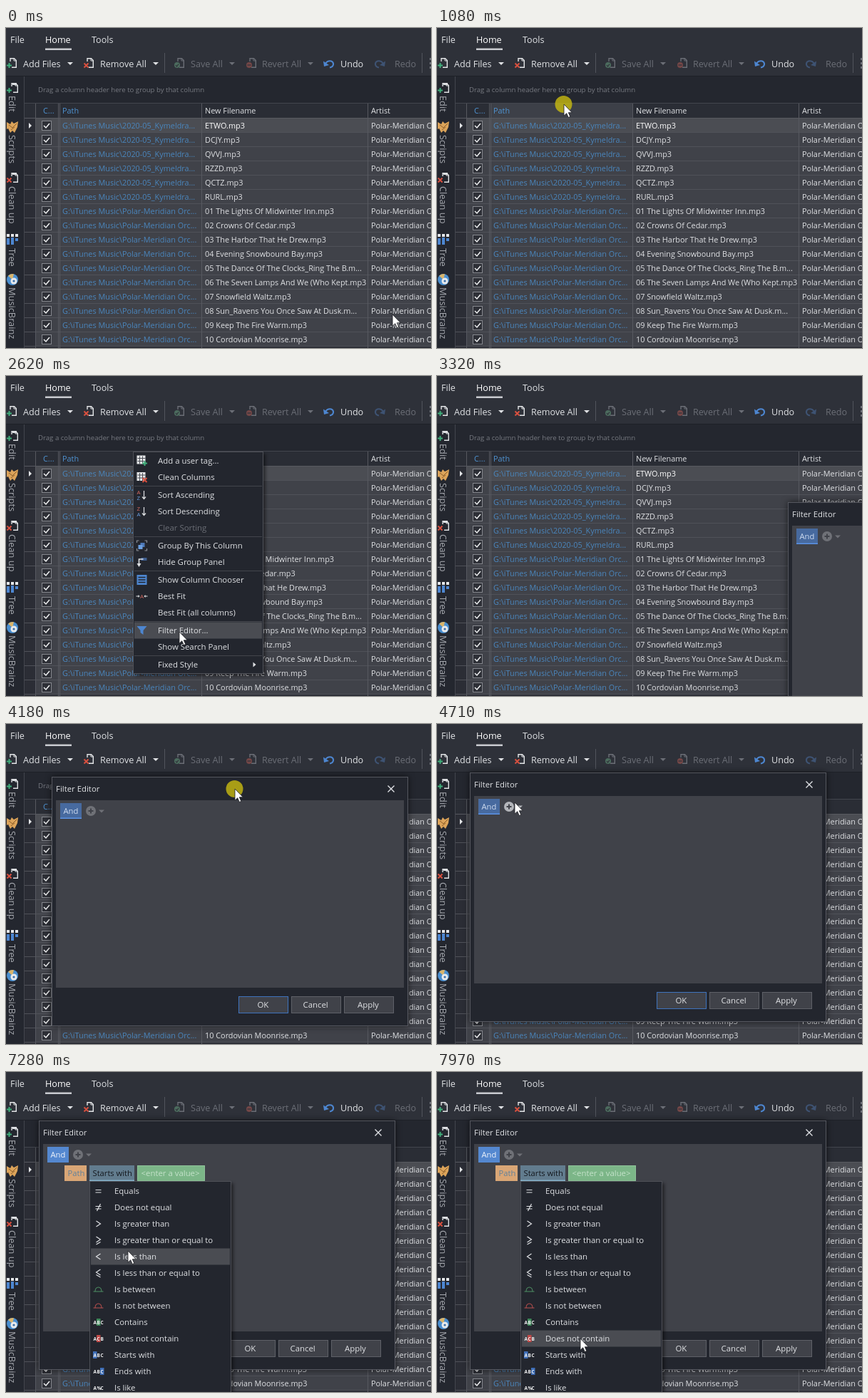
Recreate the animation shown at these times as an HTML page. Size 596x449 px, loop 8 s.

```html
<!DOCTYPE html>
<html lang="en">
<head>
<meta charset="utf-8">
<title>Filter editor demo</title>
<style>
html, body { margin: 0; width: 100%; height: 100%; overflow: hidden; background: #2e3139; }
svg { display: block; font-family: "Open Sans", "Noto Sans", sans-serif; }
.dialog { filter: drop-shadow(0 0 5px rgba(0, 0, 0, .6)); }
.menu { filter: drop-shadow(3px 3px 2px rgba(0, 0, 0, .45)); }
</style>
</head>
<body>
<svg id="stage" width="596" height="449" viewBox="0 0 596 449"></svg>
<script>
const LOOP = 8000;
const UI = 11.4, GRID = 10.87, BAR = 12.6;
const INK = '#dfe1e4', DIM = '#6b6e76', BLUE = '#4a86bd', DARK = '#23262e', BODY = '#404249', LINE = '#575960';

const rect = (x, y, w, h, fill, more = '') =>
  `<rect x="${x}" y="${y}" width="${w}" height="${h}" fill="${fill}" ${more}/>`;
const box = (x, y, w, h, fill, stroke, more = '') =>
  rect(x + .5, y + .5, w - 1, h - 1, fill, `stroke="${stroke}" ${more}`);
const text = (x, y, s, size = UI, fill = INK, more = '') =>
  `<text x="${x}" y="${y}" font-size="${size}" fill="${fill}" ${more}>${s}</text>`;
const stroke = (d, color, width = 1.2) =>
  `<path d="${d}" fill="none" stroke="${color}" stroke-width="${width}"/>`;
const fill = (d, color) => `<path d="${d}" fill="${color}"/>`;
const dot = (x, y, r, color) => `<circle cx="${x}" cy="${y}" r="${r}" fill="${color}"/>`;
const group = (id, inner, more = '') => `<g id="${id}" ${more}>${inner}</g>`;
const at = (x, y, inner) => `<g transform="translate(${x} ${y})">${inner}</g>`;
const caret = (x, y, color = INK) => fill(`M${x - 4} ${y - 2}h8l-4 4z`, color);
const cross = (x, y, r, color, w) =>
  stroke(`M${x - r} ${y - r}l${2 * r} ${2 * r}m0 ${-2 * r}l${-2 * r} ${2 * r}`, color, w);
const plus = (x, y, r, color, w) => stroke(`M${x - r} ${y}h${2 * r}M${x} ${y - r}v${2 * r}`, color, w);

// Ribbon
function page(x, y, color, mark) {
  return at(x, y, stroke('M5 5V.7H10.5L13.3 3.5V13.3H7', color, 1.4) + stroke('M10 1v3h3', color, 1) + mark);
}

function undoIcon(x, color) {
  return at(x, 43, stroke('M3 7C6 2 13 2 14 7C14.5 10 12 12 9 12.5', color, 2.2) + fill('M0 3.5L1 11L8 9z', color));
}

function ribbon() {
  const button = (x, label, color) => text(x, 55, label, BAR, color);
  return rect(0, 0, 596, 67, '#2e3139') + rect(0, 67, 596, 1, '#1d2027') +
    text(6, 21, 'File', BAR) + text(55, 21, 'Home', BAR, '#fff') + text(120, 21, 'Tools', BAR) +
    rect(55, 28.5, 37, 2.5, '#c9cbd0') +
    page(1, 42, '#e4e6e8', plus(3.5, 10.5, 3.5, '#3fae7a', 2)) + button(24, 'Add Files', INK) + caret(90, 50) +
    page(109, 42, '#e4e6e8', cross(3.5, 10.5, 3, '#d8503f', 2)) + button(132, 'Remove All', INK) + caret(210, 50) +
    rect(222, 35, 1, 28, '#51545c') +
    page(236, 42, DIM, dot(4, 10, 4, '#4c6c5e') + stroke('M2 10l1.5 2L6 8.5', '#2e3139')) +
    button(259, 'Save All', DIM) + caret(317, 50, DIM) +
    page(337, 42, DIM, dot(4, 10, 4, '#744747') + stroke('M1.5 10h5', '#2e3139')) +
    button(359, 'Revert All', DIM) + caret(427, 50, DIM) +
    undoIcon(445, '#4d86d0') + button(469, 'Undo', INK) +
    `<g transform="translate(978 0) scale(-1 1)">${undoIcon(446, '#3e5373')}</g>` + button(545, 'Redo', DIM) +
    rect(583, 35, 1, 28, '#51545c') + rect(594, 42, 2, 3, DIM) + rect(594, 48, 2, 3, DIM) + rect(594, 54, 2, 3, DIM);
}

// Side tabs
function sidebar() {
  const tabs = [
    [95, 'Edit', page(3, 77, '#dfe1e4', rect(6, 0, 6, 3, '#dfe1e4') + plus(1.5, 10.5, 3.5, '#3fae7a', 2))],
    [150, 'Scripts', fill('M1 132l5 3 2-4 3 3 6-3-1 8-4 8-3-3-3 3-3-6-2 1z', '#dca45a') +
      stroke('M4 136l5 4 6-6M7 143l5-4', '#8c5c28', 1)],
    [222, 'Clean up', page(3, 203, '#dfe1e4', rect(6, 0, 6, 3, '#dfe1e4') + cross(1.5, 10.5, 3, '#d8503f', 2))],
    [309, 'Tree', [[1, 289, 4], [7, 289, 4], [13, 289, 4]].map(([x, y, w]) => rect(x, y, w, 4, '#e4e6e8')).join('') +
      rect(1, 295, 4, 9, '#4d86d0') + rect(7, 294, 4, 10, '#4d86d0') + rect(13, 295, 4, 4, '#4d86d0')],
    [364, 'MusicBrainz', dot(9, 353, 8, '#4a8fd0') + fill('M9 353L3 347.700A8 8 0 0 1 11 345.300z', '#d9b56c') +
      dot(11, 355, 4.5, '#e8eaec') + dot(11, 355, 1.6, '#3a6ea8')]
  ];
  return rect(0, 68, 26, 381, '#24272f') + rect(25, 68, 1, 381, '#43464e') +
    tabs.map(([y, label, icon]) => icon +
      `<g transform="translate(4 ${y}) rotate(90)">${text(0, 0, label, 12.8, '#a6a9af')}</g>`).join('');
}

// Music grid
const FILES = ['ETWO', 'DCJY', 'QVVJ', 'RZZD', 'QCTZ', 'RURL',
  '01 The Lights Of Midwinter Inn', '02 Crowns Of Cedar', '03 The Harbor That He Drew',
  '04 Evening Snowbound Bay', '05 The Dance Of The Clocks_Ring The B.m...',
  '06 The Seven Lamps And We (Who Kept', '07 Snowfield Waltz',
  '08 Sun_Ravens You Once Saw At Dusk.m...', '09 Keep The Fire Warm', '10 Cordovian Moonrise'];

function row(name, i) {
  const y = 127 + 20 * i, base = y + 14;
  const folder = i < 6 ? '2020-05_Kymeldra...' : 'Polar-Meridian Orc...';
  return rect(42, y, 554, 19, i ? BODY : '#4b4d53') + rect(26, y + 19, 570, 1, '#505259') +
    box(50, y + 3, 14, 14, '#2d2f36', '#85878d') + stroke(`M53 ${y + 10}l3 3l5 -6`, '#f0f1f2', 1.5) +
    text(79, base, 'G:\\iTunes Music\\' + folder, GRID, BLUE) +
    text(279, base, name.endsWith('...') ? name : name + '.mp3', GRID, i ? INK : '#fff') +
    text(512, base, 'Polar-Meridian Orchestra', GRID);
}

function grid() {
  const columns = [41, 73, 75, 274, 507].map(x => rect(x, 106, 1, 343, LINE)).join('');
  return rect(26, 68, 570, 38, '#24272f') + text(45, 90, 'Drag a column header here to group by that column', 9.63, '#777a81') +
    rect(26, 105, 570, 344, '#2b2d35') + rect(26, 105, 570, 1, '#43464e') + rect(26, 106, 570, 20, '#2a2d35') +
    group('pathHead', rect(75, 106, 199, 20, '#3d4048')) + rect(26, 126, 570, 1, LINE) +
    text(52, 120, 'C...', GRID, '#4f93d2') + text(79, 120, 'Path', GRID, '#4f93d2') +
    text(279, 120, 'New Filename', GRID) + text(512, 120, 'Artist', GRID) +
    FILES.map(row).join('') + columns + fill('M32 133l4 4l-4 4z', '#e4e6e8');
}

// Menus: icons are drawn around their own centre
const table = mark => box(-7, -7, 12, 12, '#e4e6e8', '#e4e6e8') + stroke('M-3 -6v11M1 -6v11M-6 -3h11M-6 1h11', '#4a4d55', 1) + mark;
const letters = (a, b) => text(-7, -1, a, 8, '#d86a60') + text(-7, 7, b, 8, '#6d9fe0') + stroke('M3 -6v11M.5 2.500l2.500 3l2.500 -3', INK);
const ICON = {
  add: table(plus(4, 4, 3.5, '#3fae7a', 2)),
  clean: table(cross(4, 4, 3, '#d8503f', 2)),
  up: letters('A', 'Z'),
  down: letters('Z', 'A'),
  group: stroke('M-7 -4v-3h3M4 -7h3v3M7 4v3h-3M-4 7h-3v-3', '#8b8e95') + rect(-2, -4, 6, 6, '#4d78b8') + rect(-5, -1, 6, 6, '#6d9fe0'),
  hide: rect(-1, -6, 8, 4, '#3f5f90') + stroke('M2 -4h-6v7', INK, 1.6) + fill('M-7 2h6l-3 5z', INK),
  list: box(-7, -7, 14, 14, '#4d86d0', '#4d86d0') + stroke('M-5 -3.500h10M-5 0h10M-5 3.500h10', '#23262e', 1.4),
  fit: text(-2.5, 3, 'A', 8, '#d86a60') + stroke('M-8 0h4M8 0h-4', INK) + fill('M-5 -2v4l2 -2zM5 -2v4l-2 -2z', INK),
  funnel: fill('M-7 -6h14l-5 6v6l-4 -3v-3z', '#4d86d0'),
  sub: fill('M156 -3.500l4 3.500l-4 3.500z', INK),
  eq: stroke('M-4 -1.500h8M-4 2h8', INK),
  ne: stroke('M-4 -1.500h8M-4 2h8M3 -5l-5 10', INK),
  gt: stroke('M-3 -4l6 4l-6 4', INK),
  ge: stroke('M-3 -5l6 4l-6 4M-3 6l6 -3.500', INK),
  lt: stroke('M3 -4l-6 4l6 4', INK),
  le: stroke('M3 -5l-6 4l6 4M3 6l-6 -3.500', INK),
  between: arc('#4f9064'),
  notBetween: arc('#b9504f')
};

function arc(color) {
  return stroke('M-7 3h14M-4.500 3C-5 -5 5 -5 4.500 3', color, 1.1);
}

function abc(marked, color, chars = 'ABC') {
  const tile = marked < 0 ? '' : rect(-7.5 + 5 * marked, -5, 5.5, 10, color);
  return tile + [...chars].map((c, i) => text(-7 + 5 * i, 2.5, c, 6.5, '#f0f1f2', 'font-weight="700"')).join('');
}

function menu(id, x, y, w, h, inset, items) {
  const body = items.map(([label, cy, icon = '', color = INK]) =>
    text(x + inset, cy + 4, label, UI, color) + at(x + 12.5, cy, icon)).join('');
  return group(id, box(x, y, w, h, DARK, '#4f5158') + rect(x + 2, y, w - 4, 23, '#4a4c52', `id="${id}Hot"`) + body, 'class="menu"');
}

const COLUMN_MENU = [
  ['Add a user tag...', 118.5, ICON.add], ['Clean Columns', 142, ICON.clean],
  ['Sort Ascending', 167, ICON.up], ['Sort Descending', 190, ICON.down], ['Clear Sorting', 213, '', DIM],
  ['Group By This Column', 238, ICON.group], ['Hide Group Panel', 261, ICON.hide],
  ['Show Column Chooser', 286, ICON.list], ['Best Fit', 309, ICON.fit], ['Best Fit (all columns)', 332],
  ['Filter Editor...', 357, ICON.funnel], ['Show Search Panel', 380], ['Fixed Style', 405, ICON.sub]
];
const ADD_MENU = [['Add Condition', 136], ['Add Group', 159]];
const OPERATORS = [
  ['Equals', ICON.eq], ['Does not equal', ICON.ne], ['Is greater than', ICON.gt],
  ['Is greater than or equal to', ICON.ge], ['Is less than', ICON.lt], ['Is less than or equal to', ICON.le],
  ['Is between', ICON.between], ['Is not between', ICON.notBetween],
  ['Contains', abc(1, '#3f8a5a')], ['Does not contain', abc(1, '#c04a48', 'ACB')],
  ['Starts with', abc(0, '#3f6fb8')], ['Ends with', abc(2, '#3f6fb8')], ['Is like', abc(-1, '', 'A%C')]
].map(([label, icon], i) => [label, 167 + 23 * i, icon]);

// Filter dialog, drawn from its own top left corner
function token(id, x, y, w, label, color, ink, dim, dimInk, edge) {
  const draw = (name, bg, fg, more) => group(name, rect(x, y, w, 22, bg) + more + text(x + 4.5, y + 15, label, 11.2, fg));
  return draw(id, color, ink, '') + draw(id + 'Focus', dim, dimInk, rect(x, y + 20.5, w, 1.5, edge));
}

const removeIcon = (id, x, y) => group(id, dot(x, y, 7, '#6f7177') + cross(x, y, 2.5, BODY, 2));
const addIcon = (id, color) => group(id, dot(55, 48, 7, color) + plus(55, 48, 3.5, BODY, 2) + caret(70, 48.5, color));

function dialog() {
  const button = (x, label, tx) => box(x, 308, 70, 24, BODY, '#5f6168') + text(tx, 324, label);
  return group('dialog',
    box(0, 0, 500, 350, DARK, '#565860') + text(6, 21, 'Filter Editor') + cross(476, 17, 4.5, INK, 1.4) +
    rect(6, 33, 488, 263, BODY) +
    token('and', 12, 37, 30, 'And', '#5488d0', '#eef3fb', '#476a9f', '#cfdcf0', '#5c93e6') +
    addIcon('plus', '#6f7177') + addIcon('plusHot', '#b4b6bb') + removeIcon('andX', 89, 48) +
    group('condition',
      token('path', 36, 63, 31, 'Path', '#d9a676', '#5f819c', '#8f7763', '#566f80', '#dba878') +
      token('op', 71, 63, 63, 'Starts with', '#89b6cf', '#20262e', '#627c8e', '#14181e', '#89b6cf') +
      box(138, 63, 95, 22, '#7cb688', '#8ec299') + text(143.5, 78, '&lt;enter a value&gt;', UI, '#c4e2ca') +
      removeIcon('rowX', 250, 74)) +
    button(262, 'OK', 288.5) + button(336, 'Cancel', 352.5) + button(410, 'Apply', 429) +
    group('okRing', box(262, 308, 70, 24, 'none', '#3f73bd')), 'class="dialog"');
}

const separators = [154, 225, 273, 344, 392].map(y => rect(180, y, 179, 1, '#43454c')).join('');
document.getElementById('stage').innerHTML = ribbon() + sidebar() + grid() + dialog() +
  menu('columnMenu', 178, 106, 183, 312, 35, COLUMN_MENU).replace(/<\/g>$/, separators + '</g>') +
  menu('addMenu', 121, 122, 184, 51, 35, ADD_MENU) +
  menu('opMenu', 117, 153, 199, 320, 35, OPERATORS) +
  group('pointer', dot(-.5, 0, 12, '#c9bb10').replace('/>', ' id="click" opacity=".8"/>') +
    `<path d="M0 0V16.200L3.700 12.700L6.300 18.500L8.800 17.400L6.300 11.700H11.300Z" fill="#fff" stroke="#1c1e23" stroke-width=".8"/>`);

// Pointer moves: start, end, x, y
const MOVES = [
  [70, 230, 198, 126], [460, 610, 178, 107],
  [1620, 1930, 221, 240], [2010, 2390, 243, 349], [2470, 2470, 243, 359],
  [3170, 3320, 732, 248], [3400, 3400, 749, 194],
  [3780, 4180, 321, 91, 1], [4250, 4330, 303, 85],
  [4410, 4560, 188, 111], [4640, 4710, 109, 110], [4880, 4880, 121, 122], [5030, 5110, 128, 136],
  [5800, 5800, 112, 128], [5880, 6110, 127, 145], [6260, 6260, 142, 141],
  [7040, 7280, 171, 251], [7360, 7820, 199, 364], [7900, 7970, 201, 374]
];
const CLICKS = [[1010, 1160], [2540, 2620], [3700, 4400], [4880, 5030], [5260, 5340], [6340, 6490]];
const TICK = 77;
const $ = id => document.getElementById(id);
const show = (id, on) => { $(id).style.display = on ? '' : 'none'; };
const within = (t, a, b) => t >= a && t < b;

function pointerAt(t) {
  let x = 542, y = 402;
  for (const [from, to, nx, ny, ease] of MOVES) {
    if (t < from) break;
    const steps = Math.round((to - from) / TICK) + 1;
    const done = t >= to ? steps : Math.floor((t - from) / (to - from) * (steps - 1) + .01) + 1;
    let p = done / steps;
    if (ease) p = p * p * (3 - 2 * p);
    x += (nx - x) * p;
    y += (ny - y) * p;
  }
  return [Math.round(x), Math.round(y)];
}

function hover(id, items, x, y, left, right) {
  const hit = x > left && x < right && items.find(item => Math.abs(y - item[1]) <= 11.5);
  show(id + 'Hot', hit && hit[3] !== DIM);
  if (hit) $(id + 'Hot').setAttribute('y', hit[1] - 11.5);
}

function render(t) {
  const [x, y] = pointerAt(t);
  const move = (id, px, py) => $(id).setAttribute('transform', `translate(${px} ${py})`);
  move('pointer', x, y);
  show('click', CLICKS.some(([a, b]) => within(t, a, b)));
  show('pathHead', within(t, 460, 1090));

  show('columnMenu', within(t, 1090, 2770));
  hover('columnMenu', COLUMN_MENU, x, y, 179, 360);
  show('addMenu', within(t, 4960, 5340));
  hover('addMenu', ADD_MENU, x, y, 122, 304);
  show('opMenu', t >= 6660);
  hover('opMenu', OPERATORS, x, y, 118, 315);

  show('dialog', t >= 2960);
  if (t < 3400) move('dialog', 492, 177);
  else if (t < 4410) move('dialog', x - 257, y - 17);
  else move('dialog', 46, 68);

  const focus = t < 5340 ? 'and' : t < 6340 ? 'path' : 'op';
  for (const id of ['and', 'path', 'op']) {
    show(id, id !== focus);
    show(id + 'Focus', id === focus);
  }
  const hot = within(t, 4710, 5260);
  show('plus', !hot);
  show('plusHot', hot);
  show('condition', t >= 5340);
  show('andX', within(t, 5800, 6660) && y < 130);
  show('rowX', t < 6660 && y >= 130);
  show('okRing', t < 6660);
}

const start = performance.now();
function frame() {
  render((performance.now() - start) % LOOP);
  requestAnimationFrame(frame);
}
frame();
</script>
</body>
</html>
```
